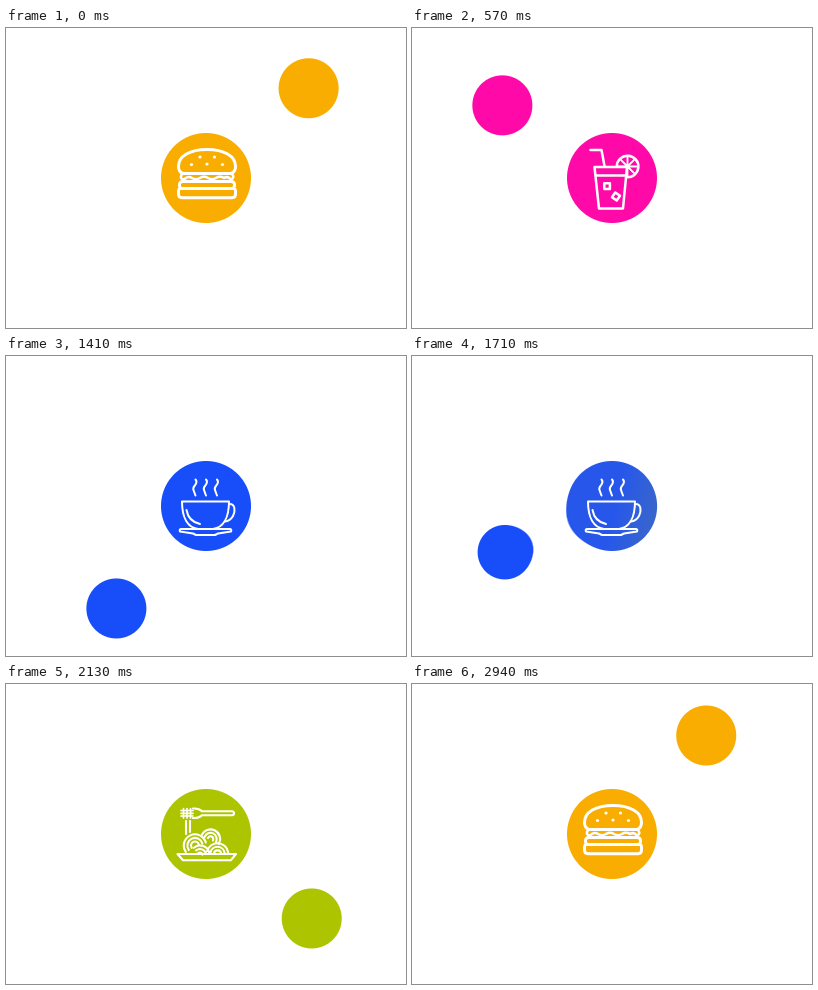
An HTML page with a canvas for the animation above (2.97 s loop, 400 px wide and 300 px high).

```html
<!DOCTYPE html>
<html lang="en">
<head>
<meta charset="utf-8">
<title>Menu blobs</title>
<style>
  html, body { margin: 0; width: 100%; height: 100%; overflow: hidden; background: #fff; }
  canvas, svg { position: absolute; left: 0; top: 0; width: 400px; height: 300px; }
  g { fill: none; stroke: #fff; stroke-linecap: round; stroke-linejoin: round; }
  .dots { fill: #fff; stroke: none; }
</style>
</head>
<body>
<canvas id="blob" width="400" height="300"></canvas>
<svg viewBox="0 0 400 300">
  <g class="icon" stroke-width="3">
    <path d="M177 145.5Q172.5 144 172.5 138.5C172.5 128 184 121.5 201 121.5S229.5 128 229.5 138.5Q229.5 144 225 145.5Z"/>
    <path d="M176 146Q173 151 178 151.5Q182 147.5 186 150T194 150T202 150T210 150T218 150Q222 147.5 225 151.5Q229 150 226 146" stroke-width="2.6"/>
    <rect x="173.5" y="153.5" width="55" height="7" rx="3"/>
    <path d="M174 160.5H228Q229.5 161 229.5 163V166Q229.5 169.7 226 169.7H176Q172.5 169.7 172.5 166V163Q172.5 161 174 160.5Z"/>
    <g class="dots">
      <circle cx="194" cy="129" r="1.6"/><circle cx="208.5" cy="129" r="1.6"/>
      <circle cx="185.5" cy="136.5" r="1.6"/><circle cx="201" cy="136" r="1.6"/><circle cx="216.5" cy="136.5" r="1.6"/>
    </g>
  </g>
  <g class="icon" stroke-width="2.5">
    <path d="M178.5 122H189.5L192.5 138M182.5 139H215L211 180.5H187ZM183.5 147.5H214"/>
    <rect x="192.3" y="155.3" width="5.6" height="5.8"/>
    <rect x="-2.9" y="-2.9" width="5.8" height="5.8" transform="translate(204 168.5) rotate(35)"/>
    <path d="M204.8 138.5A10.8 10.8 0 1 1 214.2 149.2"/>
    <path id="spokes" stroke-width="1.8"/>
  </g>
  <g class="icon" stroke-width="2">
    <path d="M176 145.5H223C223 162 217 171.5 207 173H192C182 171.5 176 162 176 145.5Z"/>
    <path d="M223 148C229.5 147.5 229.5 155 227 160Q224 165 219 165.5M180.5 154Q182.5 165.5 194 168"/>
    <path d="M175 173H224Q226 173.5 225 175.5L212 177.5L209 179H190L187 177.5L174 175.5Q173 173.5 175 173Z"/>
    <path id="steam"/>
  </g>
  <g class="icon" stroke-width="2.1">
    <path d="M175 126.5H187M175 129.3H187M175 132H187M177.5 124.5V134M181 124.5V134M184.5 124.5V134" stroke-width="1.7"/>
    <path d="M187 124.5Q193 124 196 127.3H226Q228 127.5 228 129.3T226 131.3H196Q193 134.5 187 134"/>
    <path d="M180 137V150M184 137V148"/>
    <path id="noodles"/>
    <path d="M171.5 170H230L225 176.2H177Z"/>
  </g>
</svg>
<script>
const LOOP = 2970, CYCLE = 3000, STEP = 30, CX = 200, CY = 150, CORE = 45;
const COLORS = [[248, 173, 0], [255, 10, 168], [24, 77, 250], [173, 197, 0]];
// Ball distance from the core, every 60 ms away from the farthest point.
const REACH = [136.3, 136, 133.5, 127.5, 118, 101.5, 71, 37, 15, 3, 0, 0];
const MIX = 1.25; // exponent of the core's colour crossfade

const $ = id => document.getElementById(id);
const clamp = v => Math.max(0, Math.min(1, v));
const wrap = t => ((t + CYCLE * 1.5) % CYCLE) - CYCLE / 2;
const icons = document.querySelectorAll('.icon');
const ctx = $('blob').getContext('2d');
const image = ctx.createImageData(400, 300);

const arc = (x, y, r, a, b) => {
  const point = deg => {
    const k = deg * Math.PI / 180;
    return `${x + r * Math.cos(k)} ${y - r * Math.sin(k)}`;
  };
  return `M${point(a)}A${r} ${r} 0 ${a - b > 180 ? 1 : 0} 1 ${point(b)}`;
};
$('spokes').setAttribute('d', [-90, -45, 0, 45, 90, 135, 180].map(deg => {
  const k = deg * Math.PI / 180;
  return `M215.5 138.5L${215.5 + 10 * Math.cos(k)} ${138.5 - 10 * Math.sin(k)}`;
}).join(''));
$('steam').setAttribute('d', [188.5, 199, 210].map(x =>
  `M${x + 1} 123.5C${x + 5} 128 ${x - 3} 130 ${x - 1} 134Q${x} 137 ${x + 1} 139.5`).join(''));
$('noodles').setAttribute('d',
  [11.2, 7.6, 4].map(r => arc(189, 161.5, r, 215, 15)).join('') +
  [9.6, 6.2, 2.8].map(r => arc(204.5, 155, r, 160, -30)).join('') +
  [10.8, 7.2, 3.6].map(r => arc(211.5, 170, r, 165, 8)).join('') +
  [9.5, 6, 2.5].map(r => arc(194, 171, r, 130, 10)).join(''));

function reach(u) {
  const s = Math.abs(u) / 60, i = Math.floor(s), f = s - i;
  const p = n => REACH[Math.min(Math.abs(n), REACH.length - 1)];
  const [a, b, c, d] = [p(i - 1), p(i), p(i + 1), p(i + 2)];
  return b + f / 2 * (c - a + f * (2 * a - 5 * b + 4 * c - d + f * (3 * (b - c) + d - a)));
}

function ballAt(t, k) {
  const u = wrap(t - k * CYCLE / 4 + 36);
  if (Math.abs(u) > 570) return null;
  const dist = reach(u);
  const swing = Math.max(-32, 0.085 * (u + 9));
  const angle = (45 + 90 * k - swing) * Math.PI / 180;
  const dx = Math.cos(angle), dy = -Math.sin(angle);
  return {
    dx, dy,
    x: CX + dist * dx,
    y: CY + dist * dy,
    r: 25 + 5 * clamp((dist - 90) / 40) ** 2,
    blend: Math.max(0.01, Math.min(62, 1.5 * dist)),
    tintFrom: Math.min(0.45 * dist, 40),
    tint: clamp(dist / 35),
    color: COLORS[k]
  };
}

function smoothMin(a, b, k) {
  const h = Math.max(k - Math.abs(a - b), 0) / k;
  return Math.min(a, b) - h * h * k / 4;
}

function drawBlob(balls, core) {
  const px = image.data;
  for (let y = 0, i = 0; y < 300; y++) {
    for (let x = 0; x < 400; x++, i += 4) {
      const dx = x + 0.5 - CX, dy = y + 0.5 - CY;
      let d = Math.hypot(dx, dy) - CORE, [r, g, b] = core;
      for (const ball of balls) {
        const edge = Math.hypot(dx + CX - ball.x, dy + CY - ball.y) - ball.r;
        d = smoothMin(d, edge, ball.blend);
        // The tint runs straight along the line from the core to the ball.
        const along = dx * ball.dx + dy * ball.dy;
        const m = ball.tint * clamp((along - ball.tintFrom) / (84 - ball.tintFrom));
        r += (ball.color[0] - r) * m;
        g += (ball.color[1] - g) * m;
        b += (ball.color[2] - b) * m;
      }
      px[i] = r;
      px[i + 1] = g;
      px[i + 2] = b;
      px[i + 3] = 255 * clamp(0.5 - d);
    }
  }
  ctx.putImageData(image, 0, 0);
}

function render(t) {
  const sum = [0, 0, 0], balls = [];
  COLORS.forEach((color, k) => {
    const away = Math.abs(wrap(t - k * CYCLE / 4));
    const share = clamp((570 - away) / 390);
    color.forEach((v, n) => sum[n] += v ** MIX * share);
    icons[k].style.opacity = clamp((450 - away) / 150);
    const ball = ballAt(t, k);
    if (ball) balls.push(ball);
  });
  drawBlob(balls, sum.map(v => v ** (1 / MIX)));
}

const start = performance.now();
let shown = -1;
function tick() {
  const t = Math.floor(((performance.now() - start) % LOOP) / STEP) * STEP;
  if (t !== shown) render(shown = t);
  requestAnimationFrame(tick);
}
tick();
</script>
</body>
</html>
```
